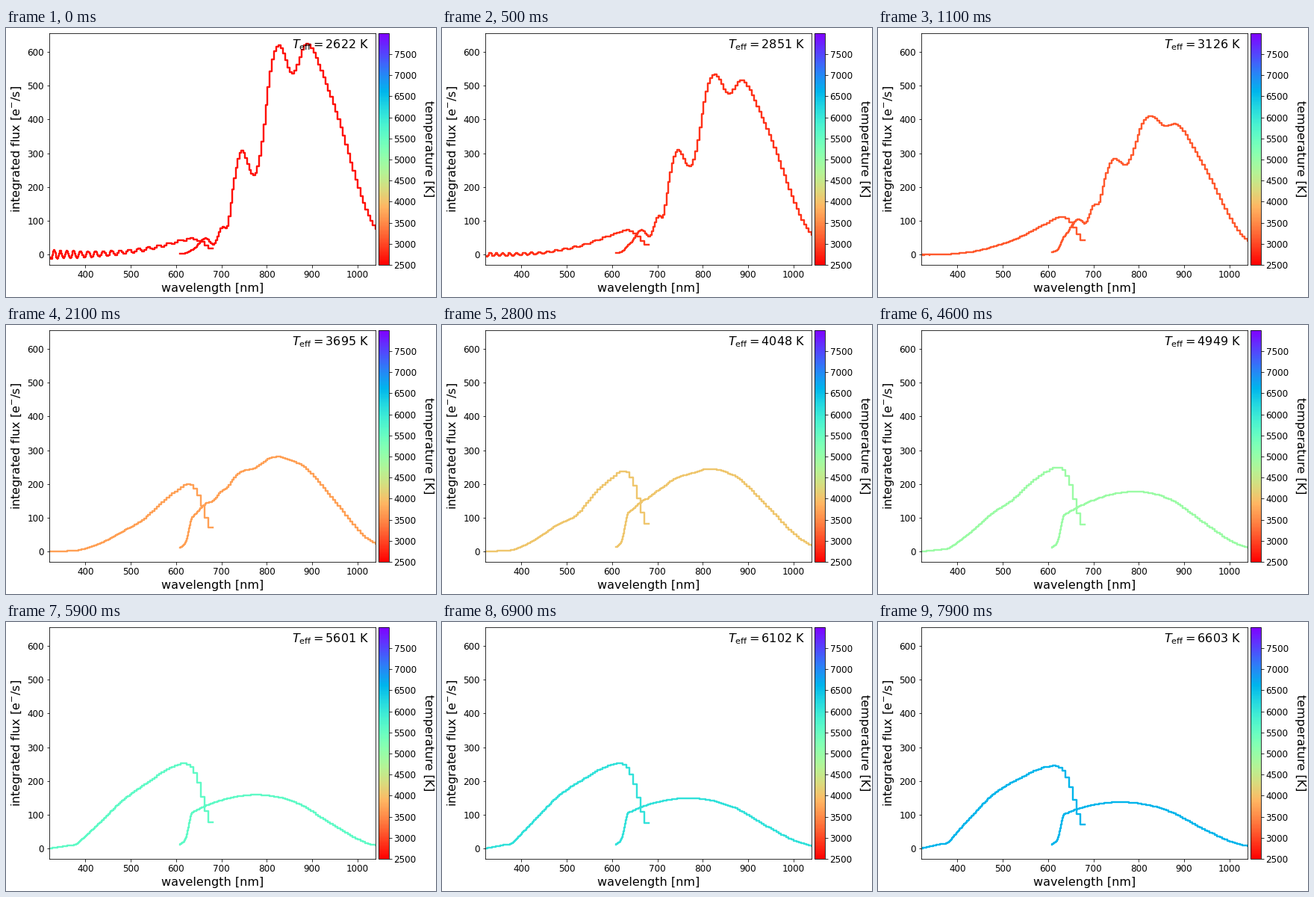
These frames come from a looping animation (576 by 360 pixels, 8 s). A matplotlib script:

```python
import numpy as np
import matplotlib.pyplot as plt
from matplotlib.animation import FuncAnimation
from matplotlib.cm import ScalarMappable
from matplotlib.colors import Normalize

W, H, DPI = 576, 360, 72
FRAMES, INTERVAL = 80, 100
COOLEST, HOTTEST = 2622, 6603
PIVOT = 900  # nm, where the overall strength is set

plt.rcParams.update({
    "font.family": "DejaVu Sans",
    "mathtext.fontset": "dejavusans",
    "axes.labelsize": 16,
    "xtick.labelsize": 12,
    "ytick.labelsize": 12,
})

# temperature over the loop, and the flux at the pivot for each
KEY_STEPS = [0, 11, 21, 35, 46, 59, 79]
KEY_TEMPS = [COOLEST, 3126, 3695, 4400, 4949, 5601, HOTTEST]
STRENGTH = [612, 364, 230, 156, 129, 110, 89]

# curve of the hottest star in each arm: (nm, flux)
BLUE_SHAPE = [(322, 1), (360, 12), (380, 18), (400, 49), (440, 107), (470, 149),
              (540, 209), (600, 242), (622, 243), (638, 224), (650, 185),
              (666, 109), (681, 55)]
RED_SHAPE = [(609, 12), (620, 26), (635, 99), (645, 106), (700, 129), (768, 137),
             (820, 129), (870, 109), (940, 60), (1020, 13), (1060, 3)]

# absorption bands of cool stars: centre, width, depth
BANDS = [(630, 14, 1.1), (683, 8, 0.8), (713, 5, 0.4), (774, 18, 0.8), (858, 15, 0.22)]


def smooth(x, points):
    """Cubic Hermite curve through the points."""
    xs, ys = np.array(points, float).T
    x = np.clip(x, xs[0], xs[-1])
    slope = np.gradient(ys, xs)
    i = np.clip(np.searchsorted(xs, x) - 1, 0, len(xs) - 2)
    h = xs[i + 1] - xs[i]
    t = (x - xs[i]) / h
    return (ys[i] * (1 + 2 * t) * (1 - t) ** 2 + ys[i + 1] * t * t * (3 - 2 * t)
            + h * t * (1 - t) * (slope[i] * (1 - t) - slope[i + 1] * t))


def bell(x, centre, width):
    return np.exp(-0.5 * ((x - centre) / width) ** 2)


def planck_ratio(x, temp):
    """Black body at temp relative to the hottest star."""
    k = 1.4388e7
    return np.expm1(k / (x * HOTTEST)) / np.expm1(k / (x * temp))


def continuum(x, temp, shape):
    scale = np.interp(temp, KEY_TEMPS, STRENGTH) / STRENGTH[-1]
    return scale * smooth(x, shape) * planck_ratio(x, temp) / planck_ratio(PIVOT, temp)


def coolness(temp):
    return np.exp(-((temp - COOLEST) / 700) ** 1.3)


def blue_flux(x, temp):
    cool = coolness(temp)
    depth = 2.05 * cool + 0.2 * np.exp(-((temp - 4300) / 600) ** 2) * bell(x, 515, 22)
    ripple = 14 * np.exp((320 - x) / 200) * np.cos(2 * np.pi * (np.log(x) - 5.803) / 0.0405)
    return continuum(x, temp, BLUE_SHAPE) * np.exp(-depth) + cool ** 4 * ripple


def red_flux(x, temp):
    depth = 1.45 / (1 + np.exp((x - 725) / 10))
    depth = depth + sum(d * bell(x, c, w) for c, w, d in BANDS)
    return continuum(x, temp, RED_SHAPE) * np.exp(-depth * coolness(temp) ** 1.4)


# prism dispersion: sample spacing grows with wavelength
n = np.arange(127)
blue_x = ((681.0 ** -2 + 5.9e-8 * n) ** -0.5)[::-1]
red_x = 580 + 130 * np.log(1 + 0.25 * np.exp(0.0445 * n))

fig = plt.figure(figsize=(W / DPI, H / DPI), dpi=DPI, facecolor="white")


def add_axes(left, right, top=7.25, bottom=317.05):
    return fig.add_axes([left / W, 1 - bottom / H, (right - left) / W, (bottom - top) / H])


ax = add_axes(57.92, 494.92)
ax.set_xlim(320, 1040)
ax.set_ylim(-30.8, 654.6)
ax.set_xticks(range(400, 1001, 100))
ax.set_yticks(range(0, 601, 100))
ax.set_xlabel("wavelength [nm]")
ax.set_ylabel("integrated flux [e$^{-}$/s]")

scale = ScalarMappable(Normalize(2500, 7993), "rainbow_r")
bar = fig.colorbar(scale, cax=add_axes(499.2, 512.6))
bar.set_ticks(range(2500, 7501, 500))
fig.text(565 / W, 1 - 162.15 / H, "temperature [K]", size=16, rotation=270,
         ha="center", va="center")

arms = []
for x, flux in ((blue_x, blue_flux), (red_x, red_flux)):
    mids = x - np.diff(x, prepend=x[0]) / 2
    line, = ax.step(x, flux(mids, COOLEST), lw=2.4)
    arms.append((line, mids, flux))
label = fig.text(434.5 / W, 1 - 27 / H, "", size=16, ha="center", va="baseline")


def draw(frame):
    temp = np.interp(frame, KEY_STEPS, KEY_TEMPS)
    color = scale.to_rgba(temp)
    for line, mids, flux in arms:
        line.set_ydata(flux(mids, temp))
        line.set_color(color)
    label.set_text(rf"$T_{{\rm eff}}={temp:.0f}$ K")
    return [label] + [arm[0] for arm in arms]


anim = FuncAnimation(fig, draw, frames=FRAMES, init_func=lambda: draw(0),
                     interval=INTERVAL, repeat=True, repeat_delay=0)
plt.show()
```
